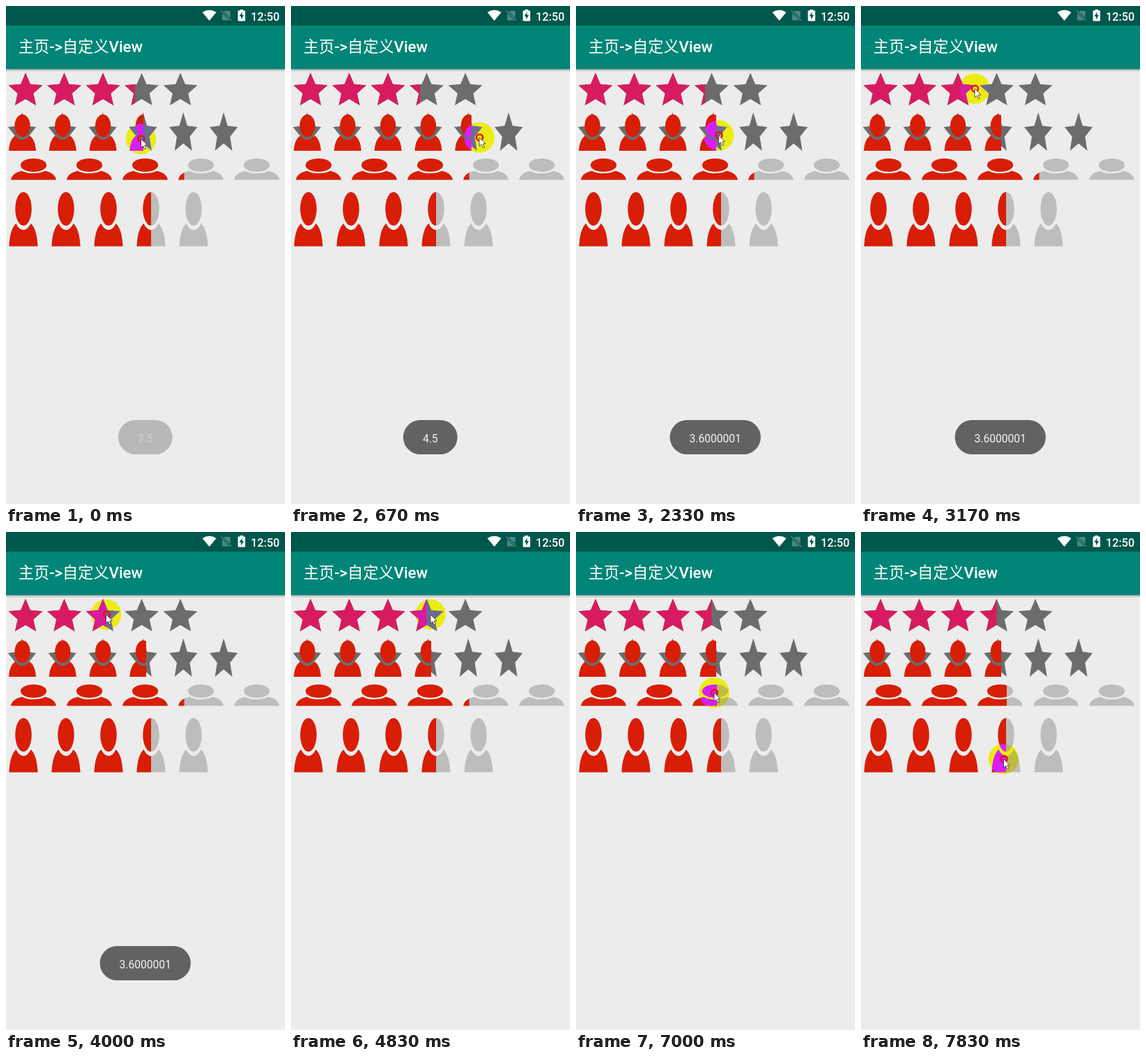
Animation of 400x712 px, one loop 8000 ms. Source, as an HTML page with a canvas:

```html
<!DOCTYPE html>
<html lang="zh-CN">
<head>
<meta charset="utf-8">
<title>Rating bars</title>
<style>
html, body { margin: 0; width: 400px; height: 712px; overflow: hidden; background: #ececec; }
canvas { display: block; width: 400px; height: 712px; }
</style>
</head>
<body>
<canvas id="stage"></canvas>
<script>
const canvas = document.getElementById('stage');
const ctx = canvas.getContext('2d');
const dpr = window.devicePixelRatio || 1;
canvas.width = 400 * dpr;
canvas.height = 712 * dpr;

const LOOP = 8000, STEP = 1000 / 6;
const RED = '#d81e06', PINK = '#d81b60', DARK = '#6c6c6c', LIGHT = '#bdbdbd';
const SANS = 'Roboto, "Noto Sans CJK SC", "Noto Sans CJK", sans-serif';

// Steps at which the pointer goes down and up on each bar
const DRAG = { mixed: [0, 14], stars: [18, 28.5], wide: [35, 43], tall: [47, 48] };
const PITCH = 57.8, ITEM = 41;

// Turning points of the pointer: step, x, y
const route = [
  [0, 193.5, 190], [4, 270, 188], [7.7, 77, 188], [12.5, 193, 185], [14, 204.5, 185],
  [18, 190, 119], [22, 82, 116], [24, 143.5, 118], [29, 200, 118], [33, 190, 292],
  [36, 185, 234.5], [38, 177, 223], [39, 177, 223], [43, 205, 232], [47, 204.5, 324.5]
];

function pointer(k) {
  const i = Math.max(1, route.findIndex(p => p[0] >= k));
  const [t0, x0, y0] = route[i - 1], [t1, x1, y1] = route[i];
  const p = Math.max(0, (k - t0) / (t1 - t0));
  return [x0 + (x1 - x0) * p, y0 + (y1 - y0) * p];
}

// Edge of a bar that follows the pointer while it is dragged
function edge(k, [down, up], rest, offset) {
  return k < down ? rest : pointer(Math.min(k, up))[0] + offset;
}

// Score of the mixed bar in tenths; it trails the pointer
function score(k, lag) {
  const x = pointer(Math.min(k, DRAG.mixed[1]) - lag)[0] - 3;
  const full = Math.floor(x / PITCH);
  return full * 10 + Math.min(10, Math.ceil((x - full * PITCH) / ITEM * 10));
}

// Prints tenths the way a 32-bit float product shows them
function floatText(tenths) {
  const f = Math.fround(tenths * Math.fround(0.1));
  let p = 1;
  while (Math.fround(Number(f.toPrecision(p))) !== f) p++;
  const n = Number(f.toPrecision(p));
  return Number.isInteger(n) ? n + '.0' : String(n);
}

function poly(points, color) {
  ctx.beginPath();
  points.forEach(p => ctx.lineTo(p[0], p[1]));
  ctx.closePath();
  ctx.fillStyle = color;
  ctx.fill();
}

function star(x, y, rx, ry, color) {
  const points = [];
  for (let i = 0; i < 10; i++) {
    const r = i % 2 ? 0.46 : 1, a = i * Math.PI / 5;
    points.push([x + rx * r * Math.sin(a), y - ry * r * Math.cos(a)]);
  }
  poly(points, color);
}

function person(x, y, w, h, color) {
  ctx.save();
  ctx.translate(x, y);
  ctx.scale(w, h);
  ctx.fillStyle = color;
  ctx.beginPath();
  ctx.ellipse(0.5, 0.31, 0.285, 0.31, 0, 0, 2 * Math.PI);
  ctx.fill();
  ctx.beginPath();
  ctx.moveTo(0, 1);
  ctx.bezierCurveTo(0.02, 0.78, 0.1, 0.65, 0.24, 0.58);
  ctx.ellipse(0.5, 0.31, 0.36, 0.39, 0, 2.377, 0.764, true);
  ctx.bezierCurveTo(0.9, 0.65, 0.98, 0.78, 1, 1);
  ctx.fill();
  ctx.restore();
}

function row(count, start, pitch, draw, color) {
  for (let i = 0; i < count; i++) draw(start + i * pitch, color);
}

function clipped(right, draw) {
  ctx.save();
  ctx.beginPath();
  ctx.rect(0, 90, right, 300);
  ctx.clip();
  draw();
  ctx.restore();
}

// Empty items with the filled ones over them up to the edge
function bar(count, start, pitch, draw, empty, filled, right) {
  row(count, start, pitch, draw, empty);
  clipped(right, () => row(count, start, pitch, draw, filled));
}

function text(str, x, y, font, color) {
  ctx.font = font + ' ' + SANS;
  ctx.fillStyle = color;
  ctx.fillText(str, x, y);
  return x + ctx.measureText(str).width;
}

function statusBar() {
  const back = '#00574b', dim = '#4c8980';
  ctx.fillStyle = back;
  ctx.fillRect(0, 0, 400, 28);
  ctx.fillStyle = '#fff';
  ctx.beginPath();
  ctx.moveTo(291.5, 21);
  ctx.lineTo(281.5, 9);
  ctx.quadraticCurveTo(291.5, 2.5, 301.5, 9);
  ctx.fill();
  poly([[313.5, 7], [321.5, 7], [321.5, 20.5], [310, 20.5], [310, 10.5]], dim);
  for (const [width, color] of [[3.4, back], [1.4, dim]]) {
    ctx.lineWidth = width;
    ctx.strokeStyle = color;
    ctx.beginPath();
    ctx.moveTo(308.5, 6.5);
    ctx.lineTo(323, 21);
    ctx.stroke();
  }
  ctx.fillStyle = '#fff';
  ctx.fillRect(335.5, 5, 4.5, 3);
  ctx.beginPath();
  ctx.roundRect(332.5, 6.5, 10.5, 15, 1);
  ctx.fill();
  poly([[338.5, 8.5], [334.5, 14.8], [337, 14.8], [337, 19.5], [341, 13], [338.5, 13]], back);
  text('12:50', 351, 20.5, '500 16.2px', '#fff');
}

function appBar() {
  const shade = ctx.createLinearGradient(0, 90, 0, 94);
  shade.addColorStop(0, 'rgba(0,0,0,.3)');
  shade.addColorStop(1, 'rgba(0,0,0,0)');
  ctx.fillStyle = shade;
  ctx.fillRect(0, 90, 400, 4);
  ctx.fillStyle = '#008577';
  ctx.fillRect(0, 28, 400, 62.2);
  let x = 17.8;
  for (const [part, weight] of [['主页', 400], ['->', 500], ['自定义', 400], ['View', 500]])
    x = text(part, x, 66, weight + ' 22.2px', '#fff');
}

function bars(k) {
  bar(5, 28, 55.5, (x, c) => star(x, 121.3, 25.7, 25.7, c), DARK, PINK,
    edge(k, DRAG.stars, 185, 0));

  const tenths = score(k, 0.7);
  row(6, 23, PITCH, (x, c) => star(x, 182.5, 21.2, 30.4, c), DARK);
  clipped(3 + Math.floor(tenths / 10) * PITCH + (tenths % 10) / 10 * ITEM, () =>
    row(6, 4, PITCH, (x, c) => person(x, 155, 39, 52, c), RED));

  bar(5, 7, 80, (x, c) => person(x, 218, 65, 30.5, c), LIGHT, RED,
    edge(k, DRAG.wide, 255.5, 4));
  bar(5, 4.5, 61, (x, c) => person(x, 266, 41, 77.5, c), LIGHT, RED, 208);
}

function toast(k) {
  const alpha = Math.min(1, 0.38 + 0.62 * k, (28 - k) / 3);
  if (alpha <= 0) return;
  const label = floatText(score(k, 0.9));
  ctx.save();
  ctx.globalAlpha = alpha;
  ctx.font = '400 15.6px ' + SANS;
  const w = ctx.measureText(label).width;
  ctx.fillStyle = '#626262';
  ctx.beginPath();
  ctx.roundRect(199.7 - w / 2 - 28, 592, w + 56, 49, 24.5);
  ctx.fill();
  text(label, 199.7 - w / 2, 623.5, '400 15.6px', '#f4f4f4');
  ctx.restore();
}

function cursor(k) {
  const [x, y] = pointer(k);
  ctx.save();
  // The highlight inverts the blue channel beneath it
  ctx.globalCompositeOperation = 'difference';
  ctx.fillStyle = '#00f';
  ctx.beginPath();
  ctx.arc(x, y, 21.8, 0, 2 * Math.PI);
  ctx.fill();
  ctx.restore();
  if (Object.values(DRAG).some(([down, up]) => k >= down && k <= up)) {
    ctx.strokeStyle = '#e8101c';
    ctx.lineWidth = 2.6;
    ctx.beginPath();
    ctx.arc(x + 0.5, y, 4.5, 0, 2 * Math.PI);
    ctx.stroke();
  }
  const arrow = [[0, 0], [0, 12.5], [2.9, 9.8], [5, 14.6], [7.2, 13.6], [5.1, 9], [9, 8.8]];
  poly(arrow.map(p => [x + p[0], y + p[1]]), '#fff');
  ctx.strokeStyle = '#333';
  ctx.lineWidth = 0.8;
  ctx.stroke();
}

function frame() {
  const t = performance.now() % LOOP;
  const k = Math.min(47, Math.floor((t + 5) / STEP));
  ctx.setTransform(dpr, 0, 0, dpr, 0, 0);
  ctx.fillStyle = '#ececec';
  ctx.fillRect(0, 0, 400, 712);
  statusBar();
  appBar();
  bars(k);
  toast(k);
  cursor(k);
  requestAnimationFrame(frame);
}
frame();
</script>
</body>
</html>
```
